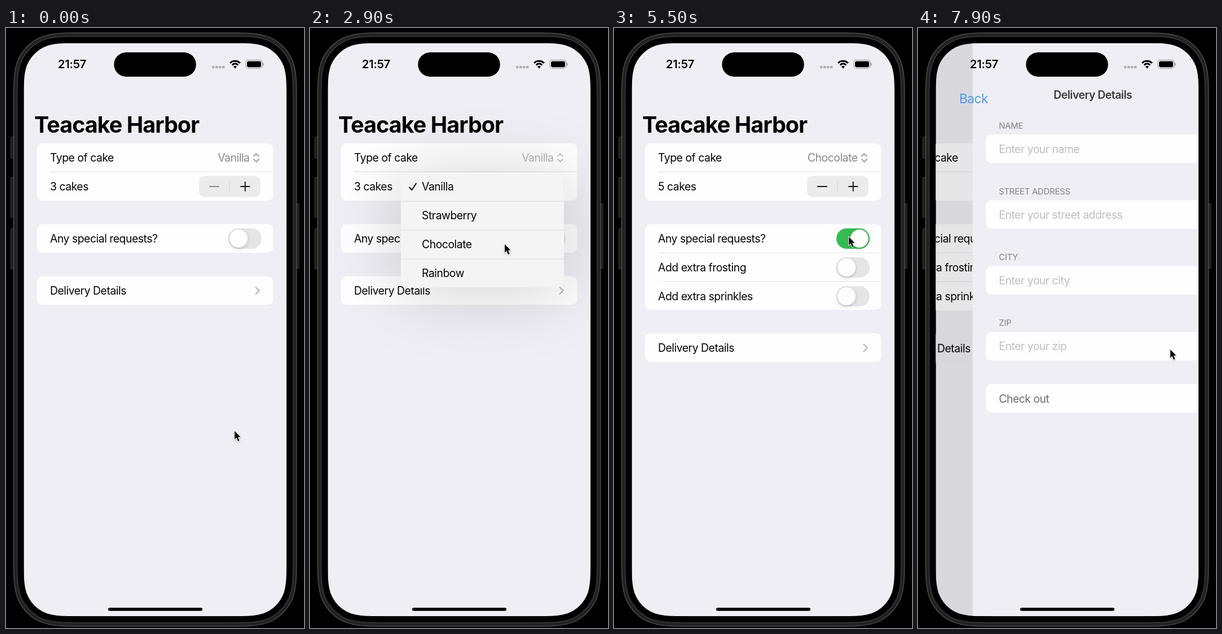
Animation, 528 px wide and 1060 px high, one loop 8000 ms. Source, as an HTML page with a canvas:

```html
<!DOCTYPE html>
<html lang="en">
<head>
<meta charset="utf-8">
<style>
  html, body { margin: 0; width: 100%; height: 100%; overflow: hidden; background: #000; }
  canvas { display: block; }
</style>
</head>
<body>
<canvas id="stage" width="528" height="1060"></canvas>
<script>
const ctx = document.getElementById('stage').getContext('2d');
const LOOP = 8000, STEP = 100;
const BG = '#efeef4', CELL = '#fefefe', LINE = '#e1e1e4', GRAY = '#88888c';
const LEFT = 31.5, TOP = 26.8, WIDTH = 465.5, HEIGHT = 1012.4;

const clamp = v => Math.max(0, Math.min(1, v));
const mix = (a, b, k) => a + (b - a) * k;
const smooth = k => k * k * (3 - 2 * k);
// Critically damped spring from 0 to 1; t and start in ms
const spring = (t, start, speed) => {
  const x = Math.max(0, t - start) / 1000 * speed;
  return 1 - (1 + x) * Math.exp(-x);
};

function box(x, y, w, h, r, fill) {
  ctx.beginPath();
  ctx.roundRect(x, y, w, h, r);
  ctx.fillStyle = fill;
  ctx.fill();
}

// Rounded rectangle whose curvature grows gradually into each corner
function squircle(x, y, w, h, r) {
  const corner = (px, py, ux, uy, vx, vy) => {
    // a runs back along the incoming edge, b along the outgoing edge
    const at = (a, b) => [px - (ux * a - vx * b) * r, py - (uy * a - vy * b) * r];
    ctx.lineTo(...at(1.529, 0));
    ctx.bezierCurveTo(...at(1.088, 0), ...at(0.868, 0), ...at(0.631, 0.075));
    ctx.bezierCurveTo(...at(0.373, 0.169), ...at(0.169, 0.373), ...at(0.075, 0.631));
    ctx.bezierCurveTo(...at(0, 0.868), ...at(0, 1.088), ...at(0, 1.529));
  };
  ctx.beginPath();
  corner(x + w, y, 1, 0, 0, 1);
  corner(x + w, y + h, 0, 1, -1, 0);
  corner(x, y + h, -1, 0, 0, -1);
  corner(x, y, 0, -1, 1, 0);
  ctx.closePath();
}

function stroke(points, color, width, cap = 'round') {
  ctx.beginPath();
  points.forEach(([x, y]) => ctx.lineTo(x, y));
  ctx.strokeStyle = color;
  ctx.lineWidth = width;
  ctx.lineCap = cap;
  ctx.lineJoin = 'round';
  ctx.stroke();
}

function text(s, x, y, { size = 19.4, color = '#050505', weight = 400, align = 'left', track = -0.025 } = {}) {
  ctx.font = `${weight} ${size}px Inter, "Open Sans", sans-serif`;
  ctx.letterSpacing = size * track + 'px';
  ctx.textAlign = align;
  ctx.fillStyle = color;
  ctx.fillText(s, x, y);
}

function withAlpha(a, draw) {
  ctx.save();
  ctx.globalAlpha *= clamp(a);
  draw();
  ctx.restore();
}

const rule = y => box(78, y, 395, 1, 0, LINE);

function toggle(y, on) {
  const shade = (a, b) => Math.round(mix(a, b, on));
  box(394, y - 18, 59, 36, 18, `rgb(${shade(229, 50)},${shade(229, 188)},${shade(231, 81)})`);
  ctx.save();
  ctx.shadowColor = 'rgba(0,0,0,.2)';
  ctx.shadowBlur = 6;
  ctx.shadowOffsetY = 2;
  ctx.beginPath();
  ctx.arc(mix(412, 435, on), y, 16, 0, 7);
  ctx.fillStyle = '#fff';
  ctx.fill();
  ctx.restore();
}

function stepper(count) {
  box(342, 261.5, 108.5, 37, 9, '#ebebec');
  box(395.5, 270, 1, 21, 0, '#d2d2d5');
  stroke([[361, 280], [377, 280]], count > 3 ? '#111' : '#8b8b8e', 1.9);
  stroke([[416, 280], [431.5, 280]], '#111', 1.9);
  stroke([[423.7, 272.2], [423.7, 287.8]], '#111', 1.9);
}

function orderPage(t) {
  const open = spring(t, 5200, 22);
  const frosting = spring(t, 6550, 22);
  const count = t < 4100 ? 3 : t < 4400 ? 4 : 5;
  const menuOpen = t >= 1900 && t < 3300;
  const detailsY = 438.5 + 102 * open;
  const pickColor = menuOpen ? '#b4b4b7' : GRAY;

  box(55, 204, 418.5, 101, 10, CELL);
  text('Type of cake', 78, 236);
  text(t < 3200 ? 'Vanilla' : 'Chocolate', 431.5, 236, { color: pickColor, align: 'right' });
  stroke([[438.7, 226.5], [443.3, 222], [448, 226.5]], pickColor, 1.6);
  stroke([[438.7, 231.8], [443.3, 236.3], [448, 231.8]], pickColor, 1.6);
  rule(253.5);
  text(count + ' cakes', 78, 287);
  stepper(count);

  const height = 50.5 + 102 * open;
  box(55, 346.5, 418.5, height, 10, CELL);
  ctx.save();
  ctx.beginPath();
  ctx.rect(55, 346.5, 419, height);
  ctx.clip();
  withAlpha(open, () => {
    rule(396.5);
    rule(447.5);
    text('Add extra frosting', 78, 430);
    text('Add extra sprinkles', 78, 481);
    toggle(423, frosting);
    toggle(474, 0);
  });
  text('Any special requests?', 78, 379);
  toggle(372, open);
  ctx.restore();

  box(55, detailsY, 418.5, 50.5, 10, t >= 7700 ? '#eeedf3' : CELL);
  text('Delivery Details', 78, detailsY + 32.5);
  stroke([[442.5, detailsY + 19.5], [448.8, detailsY + 25.5], [442.5, detailsY + 31.5]], '#b2b2b6', 2);
}

function menu(t) {
  const k = spring(t, 1800, 20) * (1 - spring(t, 3050, 20));
  if (k < 0.01) return;
  ctx.save();
  ctx.translate(440, 250);
  ctx.scale(mix(0.25, 1, k), mix(0.25, 1, k));
  ctx.translate(-440, -250);
  ctx.globalAlpha = clamp(k * 1.3);
  ctx.save();
  ctx.shadowColor = 'rgba(0,0,0,.18)';
  ctx.shadowBlur = 125;
  ctx.shadowOffsetY = 8;
  box(161, 255, 289, 203.5, 13, '#f4f4f5');
  ctx.restore();
  ['Vanilla', 'Strawberry', 'Chocolate', 'Rainbow'].forEach((name, i) => {
    text(name, 198, 287 + 51 * i);
    if (i) box(161, 254.5 + 51 * i, 289, 1, 0, '#dcdcdf');
  });
  stroke([[176.3, 281.5], [180.5, 286.3], [188, 274.7]], '#111', 2.1);
  ctx.restore();
}

function deliveryPage(x) {
  ctx.save();
  ctx.translate(x, 0);
  ctx.fillStyle = BG;
  ctx.fillRect(LEFT, TOP, WIDTH, HEIGHT);
  ['name', 'street address', 'city', 'zip'].forEach((field, i) => {
    const y = 188 + 116.3 * i;
    text(field.toUpperCase(), 78, y - 10.5, { size: 14.8, color: '#828287', track: -0.012 });
    box(55, y, 418.5, 50.5, 10, CELL);
    text('Enter your ' + field, 78, y + 32.5, { color: '#bfbfc2' });
  });
  box(55, 629, 418.5, 50.5, 10, CELL);
  text('Check out', 78, 661.5, { color: '#6c6c6e' });
  ctx.restore();
}

function screen(t) {
  const push = spring(t, 7700, 17.3);
  ctx.save();
  squircle(LEFT, TOP, WIDTH, HEIGHT, 65);
  ctx.clip();
  ctx.fillStyle = BG;
  ctx.fillRect(LEFT, TOP, WIDTH, HEIGHT);

  ctx.save();
  ctx.translate(-0.3 * WIDTH * push, 0);
  orderPage(t);
  ctx.restore();
  if (push > 0) {
    ctx.fillStyle = `rgba(0,0,0,${0.11 * push})`;
    ctx.fillRect(LEFT, TOP, WIDTH, HEIGHT);
    deliveryPage(WIDTH * (1 - push));
    withAlpha(push * 0.9, () => {
      text('Delivery Details', 264 + 326 * (1 - push), 124.5, { weight: 600, align: 'center' });
      text('Back', mix(51, 76.5, push), mix(185, 125, push), { size: mix(40, 20, push), color: '#2585ee' });
    });
  }
  withAlpha(1 - push * 1.6, () =>
    text('Teacake Harbor', 50, 185, { size: 39.5, weight: 700 }));
  menu(t);
  statusBar();
  box(181, 1024.3, 167, 5.5, 2.75, '#000');
  ctx.restore();
}

function statusBar() {
  text('21:57', 117, 71, { size: 20, weight: 600, align: 'center', track: -0.01 });
  box(191.3, 43, 145.5, 43, 21.5, '#000');
  for (let i = 0; i < 4; i++) box(365 + 6.1 * i, 67, 4.3, 4.3, 1.2, '#aaaab0');
  // Wi-Fi: a dot under two arcs
  ctx.strokeStyle = '#000';
  ctx.lineCap = 'butt';
  ctx.lineWidth = 3;
  for (const r of [7.4, 12.3]) {
    ctx.beginPath();
    ctx.arc(406, 70.5, r, -Math.PI * 0.755, -Math.PI * 0.245);
    ctx.stroke();
  }
  ctx.beginPath();
  ctx.moveTo(406, 71.5);
  ctx.arc(406, 71, 4.3, -Math.PI * 0.755, -Math.PI * 0.245);
  ctx.fillStyle = '#000';
  ctx.fill();
  ctx.beginPath();
  ctx.roundRect(425, 56.7, 29, 14.6, 4.5);
  ctx.strokeStyle = '#a0a0a5';
  ctx.lineWidth = 1.2;
  ctx.stroke();
  box(427, 58.7, 25, 10.6, 3, '#000');
  box(455, 61.7, 1.8, 4.6, 1, '#a0a0a5');
}

function phone() {
  ctx.fillStyle = '#000';
  ctx.fillRect(0, 0, 528, 1060);
  for (const [x, y, h] of [[8, 192, 38], [8, 263, 72], [8, 354, 72], [514, 310, 115]]) {
    box(x, y, 6, h, 1.5, '#3a3a3a');
    box(x + 1, y + 1, 5, h - 2, 1, '#1d1d1d');
  }
  // Nested rims: inset from the outer edge, colour
  for (const [inset, color] of [[0, '#555'], [1.2, '#222'], [6.3, '#3c3c3c'], [7.5, '#000']]) {
    squircle(13 + inset, 8 + inset, 502.5 - 2 * inset, 1049.5 - 2 * inset, 83 - inset);
    ctx.fillStyle = color;
    ctx.fill();
  }
}

// Pointer stops: time, x, y
const path = [
  [300, 405, 712], [1150, 418, 270], [1200, 418, 270], [1600, 428, 222], [2200, 428, 222],
  [2700, 345, 375], [2900, 345, 382], [3300, 345, 382], [3900, 429, 277], [4700, 429, 277],
  [5100, 416, 369], [5600, 416, 369], [6000, 415, 418], [6900, 415, 418],
  [7400, 427, 572], [7600, 447, 568], [LOOP, 447, 568]
];

function pointer(t) {
  const i = Math.max(1, path.findIndex(p => p[0] > t));
  const [t0, x0, y0] = path[i - 1], [t1, x1, y1] = path[i];
  const k = smooth(clamp((t - t0) / (t1 - t0)));
  ctx.save();
  ctx.translate(mix(x0, x1, k), mix(y0, y1, k));
  ctx.beginPath();
  for (const [x, y] of [[0, 0], [0, 14.8], [3.4, 11.8], [6, 18], [8.6, 16.9], [6, 10.8], [10.4, 10.6]]) ctx.lineTo(x, y);
  ctx.closePath();
  ctx.shadowColor = 'rgba(0,0,0,.3)';
  ctx.shadowBlur = 3;
  ctx.shadowOffsetY = 1;
  ctx.strokeStyle = '#fff';
  ctx.lineWidth = 2;
  ctx.lineJoin = 'round';
  ctx.stroke();
  ctx.shadowColor = 'transparent';
  ctx.fillStyle = '#050505';
  ctx.fill();
  ctx.restore();
}

function frame(now) {
  const t = Math.floor(now % LOOP / STEP) * STEP;
  phone();
  screen(t);
  pointer(t);
  requestAnimationFrame(frame);
}
requestAnimationFrame(frame);
</script>
</body>
</html>
```
